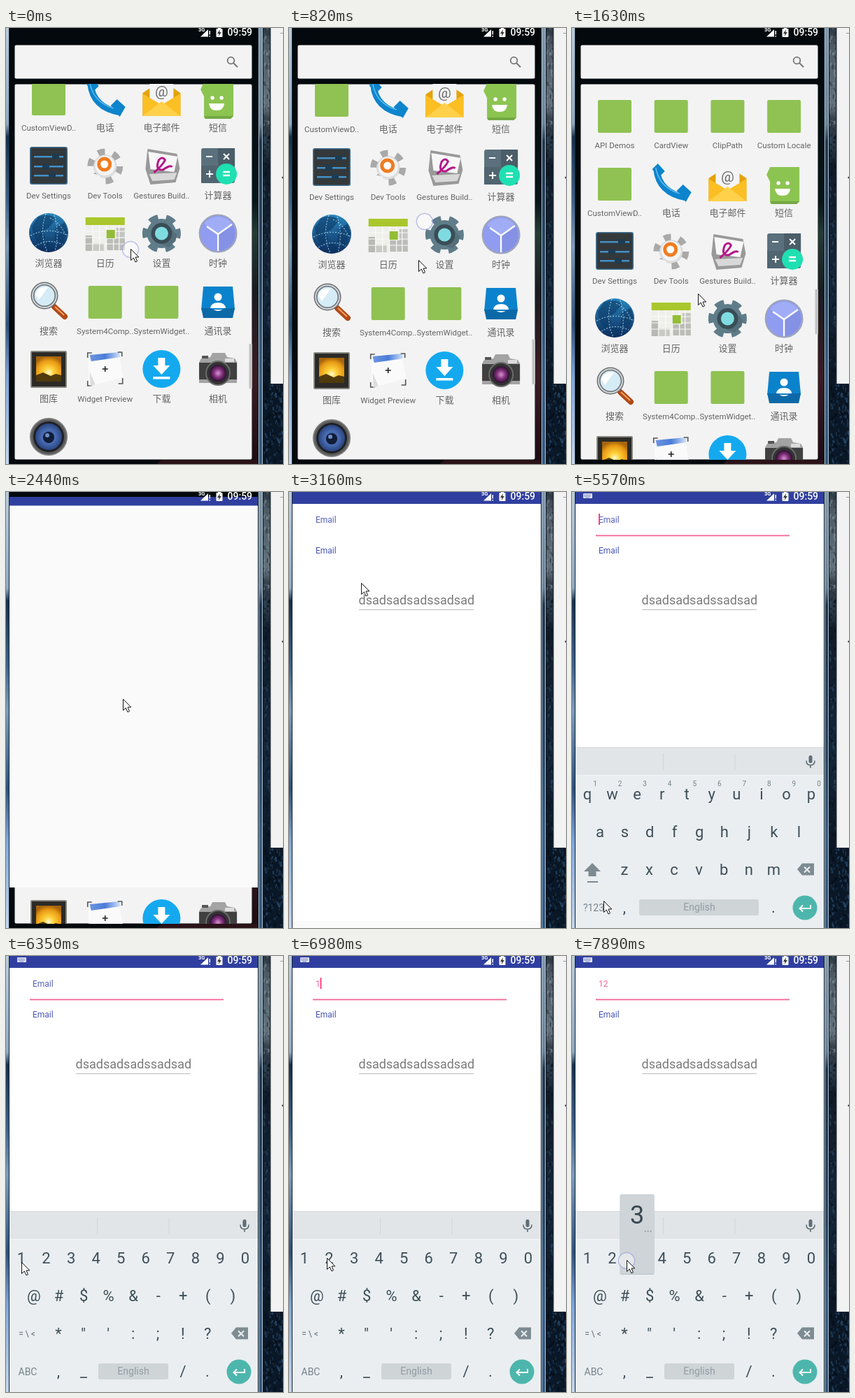
These frames come from a looping animation (396x624 px, 8 s). An HTML page:

```html
<!DOCTYPE html>
<html lang="zh">
<head>
<meta charset="utf-8">
<title>Phone demo</title>
<style>
html, body { margin: 0; width: 100%; height: 100%; overflow: hidden; background: #000; }
svg { display: block; width: 396px; height: 624px; font-family: Roboto, "Noto Sans CJK SC", "Noto Sans CJK", sans-serif; }
.mid { text-anchor: middle; }
</style>
</head>
<body>
<svg id="stage" viewBox="0 0 396 624"></svg>
<script>
const LOOP = 8000;
const TICKS = [0, 430, 560, 690, 820, 940, 1090, 1240, 1390, 1510, 1640, 1770, 1910, 2040, 2180, 2310, 2440,
  2590, 2730, 2870, 3010, 3150, 3300, 3440, 3580, 3740, 3890, 4320, 4440, 4590, 4720, 4850, 4990, 5120, 5260,
  5410, 5570, 5690, 5830, 5960, 6090, 6220, 6350, 6470, 6610, 6740, 6860, 6980, 7130, 7260, 7400, 7520, 7640, 7770, 7890];

const rect = (x, y, w, h, fill, more = '') => `<rect x="${x}" y="${y}" width="${w}" height="${h}" fill="${fill}" ${more}/>`;
const circ = (x, y, r, fill, more = '') => `<circle cx="${x}" cy="${y}" r="${r}" fill="${fill}" ${more}/>`;
const path = (d, fill, more = '') => `<path d="${d}" fill="${fill}" ${more}/>`;
const line = (d, color, width, more = '') => path(d, 'none', `stroke="${color}" stroke-width="${width}" ${more}`);
const text = (x, y, size, s, fill, more = '') => `<text x="${x}" y="${y}" font-size="${size}" fill="${fill}" ${more}>${s.replace(/&/g, '&amp;').replace(/</g, '&lt;')}</text>`;
const mid = (x, y, size, s, fill, more = '') => text(x, y, size, s, fill, 'class="mid" ' + more);
const group = (id, body, more = '') => `<g id="${id}" ${more}>${body}</g>`;
const fade = (id, stops, tag = 'linearGradient', more = 'x2="0" y2="1"') =>
  `<${tag} id="${id}" ${more}>${stops.map(([o, c]) => `<stop offset="${o}" stop-color="${c}"/>`).join('')}</${tag}>`;
const clip = (id, body) => `<clipPath id="${id}">${body}</clipPath>`;

let seed = 7;
const random = () => (seed = seed * 16807 % 2147483647) / 2147483647;

// Rough rock: short slanted strokes scattered over a box
function rocks(x, y, w, h, count, colors) {
  let out = '';
  for (let i = 0; i < count; i++) {
    const dx = random() * 6 - 3, dy = random() * 6 + 1;
    out += line(`M${(x + random() * w).toFixed(1)} ${(y + random() * h).toFixed(1)}l${dx.toFixed(1)} ${dy.toFixed(1)}`,
      colors[i % colors.length], 1 + random() * 2, 'opacity=".6"');
  }
  return out;
}

// App icons, each about 54 px wide around 0,0
const icons = {
  app: rect(-24, -22, 48, 47, '#8fc252', 'rx="2"'),
  phone: line('M-21-21Q-18 14 22 21', '#0d84cc', 9) + path('M-27-20l8-8 10 11-9 9zM8 11l9-9 12 11-8 14z', '#0d84cc') +
    line('M-22-22Q-17 6 12 15', '#5cbcf0', 1.5),
  mail: path('M-27-7L0-25 27-7V26H-27z', '#e4a20c') + rect(-17, -28, 34, 38, '#f4f4f4') +
    mid(0, -2, 21, '@', '#6b6b6b') + path('M-27-6L0 10 27-6V26H-27z', '#fbbf24') + path('M-27 26L0 5 27 26z', '#ffd04a'),
  sms: path('M-25-12L-20-23H22V26L18 30H-18Q-20 29-20 26V-2z', '#8cc451') + path('M-20 26H22L18 30H-18z', '#74a944') +
    circ(-8, 0, 2.7, '#fff') + circ(5, 0, 2.7, '#fff') + path('M-13 8H9Q8 18-2 18T-13 8z', '#fff'),
  sliders: rect(-27, -27, 54, 54, '#3f6f92', 'rx="3"') + rect(-25.5, -25.5, 51, 51, '#33383b', 'rx="2"') +
    [-13, 1, 14].map((y, i) => rect(-21, y - 1, 42, 2.5, '#4291c8') + rect([5, -9, 0][i], y - 4, 10, 8, '#1f3b50', 'rx="2"')).join(''),
  tools: circ(0, 1, 17, '#dedede') + circ(0, 1, 21, 'none', 'stroke="#a9a9a9" stroke-width="9" stroke-dasharray="10 12"') +
    circ(0, 0, 14, '#f4f4f4') + circ(-1, -2, 8, '#fff', 'stroke="#ef7c20" stroke-width="5"') + path('M-28 8L-8 14-4 28H-28z', '#f3f3f3'),
  gesture: path('M-20-24L22-17 26 4 20 24-16 27-23 5z', '#999') + path('M-19-20L23-13 18 9-16 5z', '#f7f7f7') +
    path('M-18 12L22 10 18 20-13 22z', '#d8d8d8') + line('M-11 10Q2-1 5-8 1-14-4-8-10 7 2 6 13-2 15 2', '#b5178a', 3),
  calc: rect(-24, -25, 48, 50, '#5a707c', 'rx="3"') + rect(0, -25, 24, 25, '#4a5d68') + rect(-24, 0, 24, 25, '#506570') +
    line('M-17-13h9M-17 12h10m-5-5v10M8-17l8 8m0-8l-8 8', '#fff', 2) + circ(12, 12, 15, '#1fe0b2') + line('M7 9h10m-10 5h10', '#fff', 2.4),
  globe: circ(0, -1, 28, 'url(#sea)') + path('M-15-24Q4-30 10-20L0-8-8-4-5 6-14 16-22 2-24-10zM10-8l13-8 4 14-8 17-11-4zM-2 12l9 4-5 10-9-6z', '#0d3a66', 'opacity=".6"') +
    line('M-26 3Q0-10 26 2M-19 18Q0 6 20 16M-4-28Q-14 0-2 26M8-26Q16 0 9 25M2-22Q16-16 24 2', '#bfeaf7', 1.2, 'opacity=".7" stroke-dasharray="2 2"'),
  calendar: rect(-28, -23, 56, 48, '#efefeb') + rect(-28, -23, 56, 11, '#a9c72c') +
    rect(-28, 3, 10, 22, '#b8b8b4') + rect(-18, 14, 16, 11, '#c9c9c5') + rect(16, -8, 12, 32, '#c5c5c1') + rect(2, 8, 26, 16, '#bcbcb8') +
    line('M-28-3H28M-28 6H28M-28 15H28M-18-12V25M-8-12V25M2-12V25M12-12V25M20-12V25', '#fafafa', 1.2) + rect(2, -5, 12, 12, '#93bd37'),
  gear: circ(0, 0, 21, '#5f7c89') + circ(0, 0, 22.5, 'none', 'stroke="#5f7c89" stroke-width="10" stroke-dasharray="12.6 10.96" transform="rotate(-16)"') +
    path('M10-10L22 2 20 11 10 20-10 10z', '#546e7a') + circ(0, 0, 15, '#3a4d56') + circ(0, 0, 9.5, '#80dbe0'),
  clock: circ(0, 0, 26.5, '#8f9cf0', 'stroke="#a0a5b8" stroke-width="2"') + path('M0 1L-20-14A25 25 0 0 1 20-14z', '#a0adf6') +
    path('M0 0L20-14A25 25 0 0 1 0 25z', '#8491e4') + line('M-16-10L0 1 20-13M0 1V25', '#fff', 2.3),
  lens: line('M8 8L23 22', '#b04a18', 8, 'stroke-linecap="round"') + line('M9 8L22 20', '#f2a064', 2) +
    circ(-6, -8, 17, '#d5ecf7', 'stroke="#6b7074" stroke-width="5"') + circ(-6, -8, 17, 'none', 'stroke="#d0d3d5" stroke-width="2"') +
    path('M-19-10Q-15-22-1-20L-14-2z', '#fff'),
  people: path('M-21-21H21L24 12H-24z', '#0b82cc') + path('M-24 10H-9Q0 18 9 10H24L21 24H-21z', '#0c69a8') +
    circ(0, -6, 5.5, '#fff') + path('M-11 10Q-10 2 0 2T11 10z', '#fff'),
  gallery: rect(-26, -26, 52, 53, '#85857f', 'rx="2"') + rect(-24, -24, 48, 49, '#2b2a26') + rect(-18, -18, 36, 36, 'url(#sun)') +
    path('M-18 9L-8 5 3 10 10 7 18 9V18H-18z', '#503a0c'),
  widget: path('M-24-12L20-20 26 12-23 25z', '#fafafa') + path('M-22-20L20-24 22-17-20-11z', 'url(#bar)') +
    line('M-25-16v-7h6M18-24h6v6M25 13v8h-6M-19 24h-6v-7', '#555', 1.6) + line('M-4 0H4M0-4V4', '#222', 1.6) + path('M-22 4l8 18-7 3z', '#ddd'),
  down: circ(0, 0, 27, '#14a9ef') + path('M-5-16H5V-5H12L0 8-12-5H-5z', '#fff') + rect(-12, 11, 24, 3.5, '#fff'),
  camera: path('M-24-15L-11-17-8-23H10L13-17 24-15 27-10V20H-27V-10z', '#a3a3a3') + rect(-27, -9, 54, 24, '#404040') +
    rect(-23, -19, 9, 4, '#555') + rect(10, -15, 13, 5, '#ddd') + circ(0, 6, 17, '#333', 'stroke="#6c6c6c" stroke-width="2"') + circ(0, 6, 12, 'url(#glass)'),
  speaker: circ(0, 0, 26, '#5a5a5a', 'stroke="#7c7c7c" stroke-width="2"') + circ(0, 0, 22, '#1e2024') + circ(0, 0, 19, 'url(#cone)') + circ(0, 1, 8, '#101c38') + circ(-2, -2, 3, '#6c8fc8')
};

const rows = [
  ['app API Demos', 'app CardView', 'app ClipPath', 'app Custom Locale'],
  ['app CustomViewD..', 'phone 电话', 'mail 电子邮件', 'sms 短信'],
  ['sliders Dev Settings', 'tools Dev Tools', 'gesture Gestures Build..', 'calc 计算器'],
  ['globe 浏览器', 'calendar 日历', 'gear 设置', 'clock 时钟'],
  ['lens 搜索', 'app System4Comp..', 'app SystemWidget..', 'people 通讯录'],
  ['gallery 图库', 'widget Widget Preview', 'down 下载', 'camera 相机'],
  ['speaker 音乐']
];
const apps = rows.map((row, r) => row.map((entry, c) => {
  const [icon, ...words] = entry.split(' '), name = words.join(' '), y = 3 + 97 * r;
  return `<g transform="translate(${61 + c * 80.7} ${y})">${icons[icon]}${mid(0, 46.5, name > '~' ? 13 : 11.5, name, '#646464')}</g>`;
}).join('')).join('');

// Keyboard
const INK = '#3e4f58', STEP = 35.55;
const keys = (s, x, y, size = 22) => [...s].map((c, i) => mid(x + i * STEP, y, size, c, INK)).join('');
const space = (x, w) => rect(x, 583, w, 23, '#cfd4d7', 'rx="3"') + mid(182, 599, 14, 'English', '#8f9da4');
const board = rect(5, 366, 355, 258, '#eaeef1') + rect(5, 366, 355, 39, '#e1e5e8') + rect(5, 365, 355, 1, '#d5d9dc') + rect(5, 405, 355, 1, '#f3f5f6') +
  line('M130.5 374v24M233 374v24', '#d0d5d8', 1) +
  rect(338.5, 377, 5, 11, '#5f6d74', 'rx="2.5"') + line('M335 384.5q0 6.5 6 6.5t6-6.5M341 391v4', '#5f6d74', 1.6) +
  path('M322 540l7-8.5h17v17h-17z', '#7d8b92') + line('M332 536.5l8 8m0-8l-8 8', '#eaeef1', 2) +
  circ(333, 595, 17.5, '#4db6ac') + line('M341 591v5h-15m4-4.5l-4.5 4.5 4.5 4.5', '#fff', 2) +
  keys(',', 75, 602) + keys('.', 288, 602);
const letters = keys('qwertyuiop', 22, 440) + [...'1234567890'].map((c, i) => mid(33 + i * STEP, 421, 10, c, '#74838a')).join('') +
  keys('asdfghjkl', 40, 494) + keys('zxcvbnm', 75, 548) +
  path('M29 531L41 543H34.5V550H23.5V543H17z', '#7d8b92') + rect(22, 557, 15, 2, '#7d8b92') +
  mid(31, 600, 14, '?123', '#74838a') + space(96, 171);
const symbols = keys('1234567890', 22, 440) + keys('@#$%&-+()', 40, 494) + keys('*"\':;!?', 75, 548) +
  mid(30, 545, 12, '= \\ <', '#5f6d74') + mid(31, 600, 14, 'ABC', '#74838a') + keys('_', 111, 602) + keys('/', 253, 602) + space(132, 100);

const INDIGO = '#303f9f', PINK = '#ff4081';

document.getElementById('stage').innerHTML = `<defs>
${fade('edge', [[0, '#b9cbdb'], [.22, '#8faac2'], [.25, '#16304c'], [.4, '#3f6288'], [.5, '#7d9cba'], [.68, '#2e5079'], [.8, '#7fa5d8'], [1, '#c3d6ea']])}
${fade('glassEdge', [[0, '#7f97aa'], [.22, '#6b8397'], [.26, '#22384e'], [.6, '#2b4866'], [.8, '#3b5f85'], [1, '#35577c']])}
${fade('rock', [[0, '#2b3640'], [.04, '#4d5a64'], [.18, '#65737d'], [.21, '#323d46'], [.27, '#293744'], [.32, '#101b28'], [.6, '#15263a'], [.83, '#0a1624'], [1, '#0a1828']])}
${fade('wall', [[0, '#010608'], [.4, '#07161a'], [.47, '#243b35'], [.6, '#181c20'], [.8, '#3b1c24'], [1, '#1c0b12']])}
${fade('sea', [[0, '#2a86bd'], [1, '#0c2c5c']])}
${fade('sun', [[0, '#fffbd0'], [.3, '#ffd23c'], [.75, '#e89a14'], [1, '#a8650c']], 'radialGradient', 'cy=".65" r=".65"')}
${fade('bar', [[0, '#6d95e0'], [.5, '#4a7cd8'], [1, '#d5e4fa']], 'linearGradient', '')}
${fade('glass', [[0, '#d596cf'], [.5, '#86327f'], [1, '#2a1030']], 'radialGradient', '')}
${fade('cone', [[0, '#16284f'], [.5, '#4a6db4'], [1, '#2a4580']], 'radialGradient', '')}
${clip('list', rect(12, 80, 340, 538, '#000', 'rx="2"'))}
${clip('reveal', '<rect id="hole"/>')}
${clip('screen', rect(5, 0, 355, 624, '#000'))}
</defs>` +
  rect(0, 0, 396, 624, 'url(#rock)') +
  rocks(367, 0, 11, 150, 60, ['#8796a0', '#27323c', '#55636e']) +
  rocks(367, 150, 11, 360, 130, ['#050d16', '#2c4660', '#0b1724']) +
  rocks(367, 509, 30, 115, 190, ['#040b14', '#2f5378', '#0a1a2b', '#1b3a58']) +
  rect(377, 0, 19, 510, '#1d2833') + rect(378.5, 0, 18, 509, '#f2f2f2') + rect(392, 7, 4, 1, '#999') + circ(396, 214, 1.6, '#333') +
  rect(0, 0, 4, 624, 'url(#edge)') + rect(4, 0, 1, 624, '#16222e') +
  rect(360, 0, 8, 624, '#0f1822') + rect(361, 0, 6, 624, 'url(#glassEdge)') + rect(361, 0, 1, 624, '#a9c2d4') + rect(366, 0, 1, 624, '#a9c2d4') +
  rect(5, 0, 355, 624, '#03090c') + rect(352, 0, 8, 624, 'url(#wall)') + path('M216 624L222 618H360V624z', '#2a1219') +
  rect(12.5, 24.5, 339, 48, '#f3f3f3', 'rx="2"') + circ(321.5, 46.5, 4.8, 'none', 'stroke="#757575" stroke-width="1.8"') + line('M325 50l6 6', '#757575', 2) +
  rect(12.5, 80.5, 339, 537, '#f3f3f3', 'rx="2"') +
  `<g clip-path="url(#list)">${group('apps', apps)}</g>` +
  rect(347.5, 452, 4.5, 64, '#c3c3c3', 'id="thumb"') +
  `<g clip-path="url(#reveal)">${group('win',
    rect(5, -5, 355, 640, '#fafafa') + rect(5, -5, 355, 22, INDIGO) +
    group('form', rect(5, 17, 355, 597, '#fff') +
      text(38, 44, 12, 'Email', '#5460b8', 'id="field"') + text(38, 88, 12, 'Email', '#4855b4') +
      text(99.5, 161, 18, 'dsadsadsadssadsad', '#7b7b7b') + rect(100, 168, 164, 1, '#bdbdbd') +
      rect(34, 61.5, 277, 1.8, '#f2669a', 'id="under"') + rect(38, 31, 2, 16, PINK, 'id="caret"')))}</g>` +
  group('board', board + group('letters', letters) + group('symbols', symbols), 'clip-path="url(#screen)"') +
  group('popup', rect(0, 342, 49, 114, '#8b9398', 'rx="2" opacity=".5"') + rect(0, 341, 49, 114, '#cfd4d8', 'rx="2"') +
    mid(24.5, 383, 36, '', '#37474f', 'id="digit"') + [36, 40, 44].map(x => circ(x, 394, 1, '#8b979d')).join('')) +
  text(275, 5, 7.5, '3G', '#fff', 'font-weight="700"') + path('M278 12.5L289 2V12.5z', '#fff') + rect(290.5, 4, 1.5, 5.5, '#fff') + rect(290.5, 11, 1.5, 1.5, '#fff') +
  rect(300.5, 1, 9, 12, '#fff', 'rx="1"') + rect(303, -1, 4, 2, '#fff') + path('M306 2l-4 6h2.5l-.7 4 4-6h-2.5z', '#333') +
  text(316.5, 11, 14, '09:59', '#fff', 'font-weight="500"') +
  group('ime', rect(16, 2, 13, 7, '#dfe2f2', 'rx="1"') + line('M17.5 4h10M17.5 6h10M19.5 8h6', INDIGO, 1, 'stroke-dasharray="1 1"')) +
  circ(0, 0, 11.5, '#fff', 'id="touch" fill-opacity=".45" stroke="#8c96dc" stroke-opacity=".55" stroke-width="1.5"') +
  path('M.5.5V16.5L4.3 13 7 19 9.5 17.8 7 12H11.8z', '#fff', 'id="mouse" stroke="#111" stroke-linejoin="round"');

const $ = id => document.getElementById(id);
const show = (id, on) => { $(id).style.display = on ? '' : 'none'; };
const move = (id, x, y) => $(id).setAttribute('transform', `translate(${x} ${y})`);

// Linear track: rows of [time, ...values]
function track(rows, t) {
  const i = rows.findIndex(r => r[0] > t);
  if (i < 0) return rows[rows.length - 1].slice(1);
  if (!i) return rows[0].slice(1);
  const a = rows[i - 1], b = rows[i], k = (t - a[0]) / (b[0] - a[0]);
  return a.slice(1).map((v, j) => v + (b[j + 1] - v) * k);
}

const mouse = [[0, 178, 316], [430, 178, 316], [690, 194, 277], [820, 185, 332], [940, 184, 368], [1240, 182, 400], [1510, 180, 380],
  [1770, 167, 296], [2590, 167, 296], [3440, 70, 44], [3740, 65, 39], [3890, 63, 38], [4720, 63, 38], [5260, 66, 480], [5570, 45, 585],
  [5690, 36, 591], [5960, 36, 591], [6350, 22, 438], [6740, 22, 438], [6980, 54, 432], [7130, 57, 433], [7400, 57, 433], [7770, 77, 435], [7890, 78, 435]];
const scroll = [[690, 0], [820, 2], [940, 52], [1090, 95], [1240, 116], [1390, 122]];
const reveal = [[2180, 90, 230, 110, 160], [2310, 20, 80, 320, 360], [2440, 5, 7, 355, 559], [2590, 5, 0, 355, 624]];
const rise = [[4590, 258], [4720, 130], [4850, 40], [4990, 0]];
const touches = [[0, 430], [690, 1390], [1910, 2180], [4320, 4590], [5690, 5960], [6610, 6740], [7130, 7260], [7890, LOOP]];
const popups = [[6610, 6740, 1], [7130, 7260, 2], [7890, LOOP, 3]];
const edits = [[4440, 'Email', 0], [6740, '1', 6.5], [7260, '12', 13]];

function draw(now) {
  const t = TICKS.filter(v => v <= now % LOOP).pop();
  const inside = ([a, b]) => t >= a && t < b;

  const [mx, my] = track(mouse, t), [s] = track(scroll, t);
  move('mouse', mx, my);
  show('touch', touches.some(inside));
  // The touch ring trails behind the pointer while dragging
  if (t >= 690 && t < 1390) move('touch', 194 - s * .1, 275 + s);
  else move('touch', mx, my + 1);
  move('apps', 0, s);
  move('thumb', 0, t < 820 ? 0 : -5 - s * .6);

  const hole = track(reveal, t);
  ['x', 'y', 'width', 'height'].forEach((k, i) => $('hole').setAttribute(k, t < 2180 ? 0 : hole[i]));
  move('win', 0, track([[2180, 20], [2440, 2.5], [2590, 0]], t)[0]);
  show('form', t >= 2870);

  const [start, value, width] = edits.filter(e => t >= e[0]).pop() || [0, 'Email', 0];
  $('field').textContent = value;
  $('field').setAttribute('fill', value === 'Email' ? '#5460b8' : '#f2669a');
  $('caret').setAttribute('x', 38 + width);
  show('caret', start && (t - start) % 1000 < 500);
  const half = 138.5 * track([[4440, 0], [4850, 1]], t)[0];
  $('under').setAttribute('x', 172.5 - half);
  $('under').setAttribute('width', half * 2);

  show('board', t > 4590);
  move('board', 0, track(rise, t)[0]);
  show('letters', t < 5960);
  show('symbols', t >= 5960);
  show('ime', t >= 4850);

  const pop = popups.find(inside);
  show('popup', pop);
  if (pop) {
    $('digit').textContent = pop[2];
    move('popup', Math.max(7, 22 + (pop[2] - 1) * STEP - 24.5), 0);
  }
}

function frame(now) {
  draw(now);
  requestAnimationFrame(frame);
}
draw(0);
requestAnimationFrame(frame);
</script>
</body>
</html>
```
